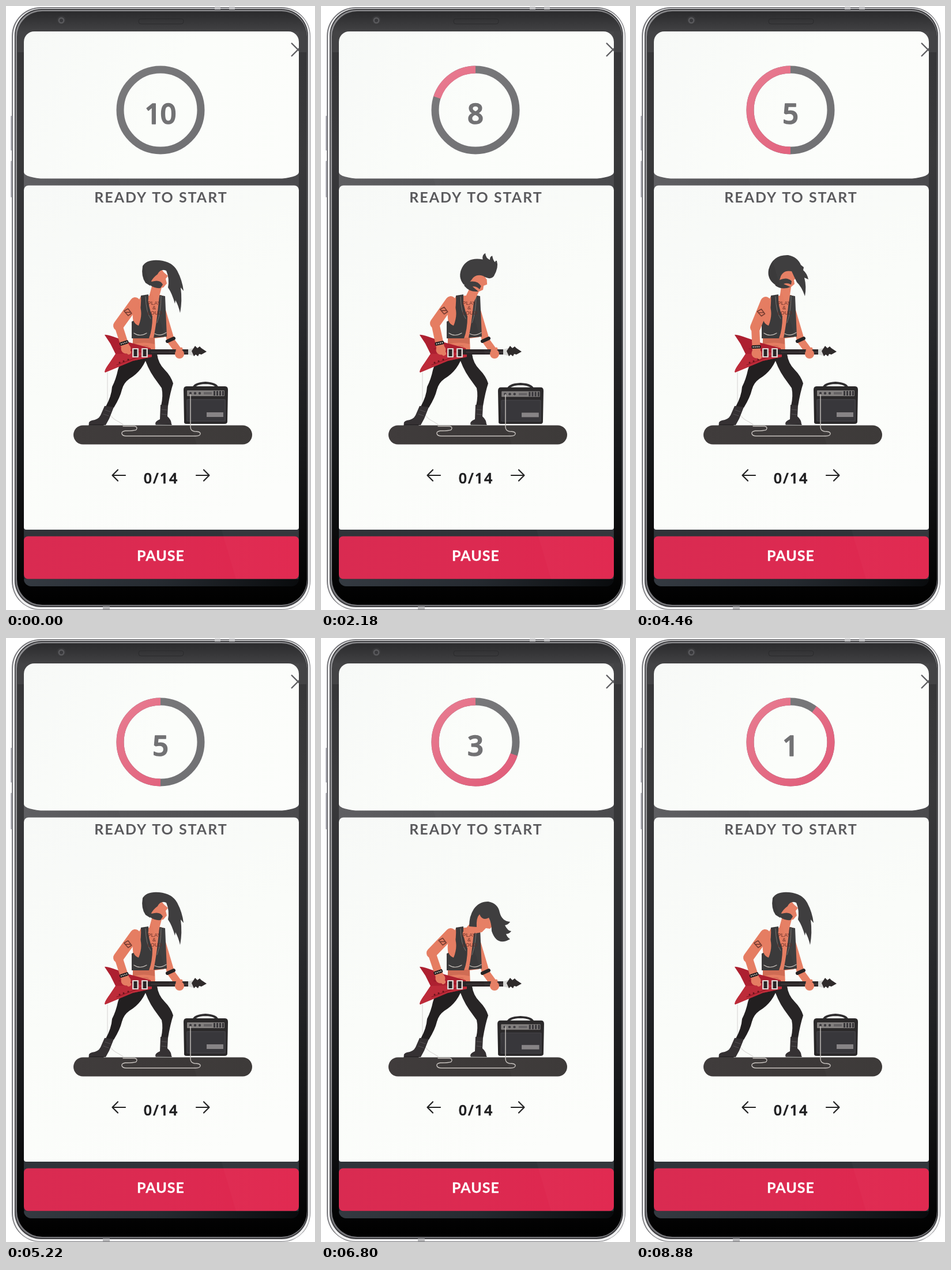
Animation, 536 px wide and 1045 px high, one loop 8900 ms. Source, as an HTML page with a canvas:

```html
<!DOCTYPE html>
<html lang="en">
<head>
<meta charset="utf-8">
<title>Ready to start</title>
<style>
html, body { margin: 0; width: 100%; height: 100%; overflow: hidden; background: #fff; }
canvas { display: block; width: 536px; height: 1045px; }
</style>
</head>
<body>
<canvas id="stage" width="536" height="1045"></canvas>
<script>
const ctx = document.getElementById('stage').getContext('2d');
const LOOP = 8900, BEAT = 888, POSES = 6;
const SKIN = '#e57d62', SKIN_DARK = '#cf6c54', HAIR = '#3b3a3b', BLACK = '#221f20', RED = '#ad2030';

// One head-bang cycle; each pose is held for a sixth of the beat.
const base = { amp: 0, fret: [286, 579, 302, 601] };
const up = {
  ...base,
  neck: [257, 510, 261, 482],
  face: 'M246 452L268 452L272 459L276 462L279 470L274 474L275 481L268 487L252 489L246 478Z',
  beard: 'M236 468Q242 473 249 474Q262 468 270 476L269 482Q262 478 256 481L268 486Q254 492 242 484Z'
};
const flung = {
  ...up, arm: [225, 512, 206, 556, 209, 601],
  hair: 'M240 482Q226 473 229 455Q233 434 259 431Q255 425 260 419Q263 427 271 428Q269 422 273 420Q277 428 281 429Q280 426 283 426Q290 436 286 453Q282 462 268 458Q254 458 251 470Q248 479 240 482Z'
};
const poses = [
  { ...up, arm: [225, 512, 207, 556, 209, 601],
    hair: 'M241 482Q227 472 230 456Q237 430 264 431Q280 434 286 448L291 452L290 457Q297 463 299 473L292 470Q296 485 293 502Q287 485 279 478Q274 468 270 459Q254 456 250 471Q248 479 241 482Z' },
  flung,
  { ...flung, arm: [225, 511, 198, 549, 208, 595], tilt: 0.3, amp: 0.5 },
  { ...base, arm: [225, 511, 192, 545, 207, 589], neck: [254, 512, 273, 490], amp: 1,
    face: 'M266 474L286 474L294 490L297 499L293 503L286 502L279 509L268 511L261 500Z',
    hair: 'M257 499Q257 481 265 469Q274 456 290 456Q307 459 310 475Q314 490 328 491Q325 496 319 497Q324 507 330 507Q327 512 321 512Q323 518 328 521Q305 534 296 507Q296 493 291 484Q280 490 275 478Q269 484 270 500Z' },
  { arm: [224, 511, 201, 551, 208, 597], fret: [273, 575, 281, 602], neck: [254, 513, 274, 494], amp: 1,
    face: 'M266 480L287 479L296 496L298 507L294 511L286 508L279 513L268 513L261 501Z',
    hair: 'M260 503Q260 485 268 475Q280 463 294 463Q308 467 310 481Q318 484 322 481Q323 487 317 490Q322 493 326 491Q324 500 317 502Q318 508 321 511Q308 520 299 511Q299 497 292 489Q282 494 276 481Q270 486 271 502Z' },
  { ...base, arm: [224, 513, 195, 553, 208, 593], neck: [255, 510, 262, 484],
    face: 'M252 458L270 456L274 461L281 467L277 472L279 480L273 487L256 490L250 478Z',
    beard: 'M244 474Q251 478 257 476Q268 474 272 482L268 488Q258 489 250 483Z',
    hair: 'M250 484L242 479Q234 468 237 450Q244 438 266 440Q288 442 297 458Q306 475 308 493L303 487Q306 510 302 531Q299 518 294 509L293 515Q288 497 281 487Q284 472 278 458Q268 454 263 464Q256 469 252 476Z' }
];

function box(x, y, w, h, r, fill) {
  ctx.beginPath();
  ctx.roundRect(x, y, w, h, r);
  ctx.fillStyle = fill;
  ctx.fill();
}
function shape(d, fill) {
  ctx.fillStyle = fill;
  ctx.fill(new Path2D(d));
}
function line(d, color, width) {
  ctx.strokeStyle = color;
  ctx.lineWidth = width;
  ctx.stroke(new Path2D(d));
}
function dot(x, y, r, fill) {
  ctx.beginPath();
  ctx.arc(x, y, r, 0, Math.PI * 2);
  ctx.fillStyle = fill;
  ctx.fill();
}
// A thin outline rounds the letter ends.
function label(text, x, y, font, color, spacing = 0, outline = 0) {
  ctx.font = font;
  ctx.letterSpacing = spacing + 'px';
  ctx.fillStyle = ctx.strokeStyle = color;
  ctx.textAlign = 'center';
  ctx.fillText(text, x + spacing / 2, y);
  if (!outline) return;
  ctx.lineWidth = outline;
  ctx.lineJoin = 'round';
  ctx.strokeText(text, x + spacing / 2, y);
}
function fade(x0, y0, x1, y1, ...colors) {
  const g = ctx.createLinearGradient(x0, y0, x1, y1);
  colors.forEach((c, i) => g.addColorStop(i / (colors.length - 1), c));
  return g;
}

function drawPhone() {
  ctx.fillStyle = '#fff';
  ctx.fillRect(0, 0, 536, 1045);
  box(8, 190, 3, 60, 1, '#b0b0b8');
  box(8, 268, 3, 63, 1, '#b0b0b8');
  box(10, 2, 518, 1043, 50, '#77777b');
  box(12, 4, 515, 1040, 48, '#f0f0f1');
  box(15, 5, 509, 1035, 46, '#3c3c3f');
  box(16.5, 7, 506, 1031, 45, fade(0, 7, 0, 1038, '#8c8c8f', '#a0a0a3', '#77777b'));
  box(19, 9, 503, 1027, 44, fade(0, 9, 0, 1036, '#363638', '#39393b', '#2a2b2e', '#17181a', '#000'));
  box(20, 10, 501, 70, [43, 43, 0, 0], fade(0, 10, 0, 46, '#2b2b2d', '#434345'));
  for (const x of [362, 387]) box(x, 1, 10, 5, 0, '#c2c2c4');
  box(168, 1039, 12, 5, 0, '#b5b5b7');
  dot(96, 25, 8, '#39393b');
  dot(96, 25, 5.5, '#59595c');
  dot(96, 25, 3, '#39393c');
  ctx.beginPath();
  ctx.roundRect(230, 22, 78, 9, 4);
  ctx.strokeStyle = '#2b2b2d';
  ctx.lineWidth = 1;
  ctx.stroke();

  const wide = { x: 36, y: 11 };
  box(31, 44, 477, 960, [18, 18, 18, 18], fade(0, 299, 0, 1004, '#505052', '#3b3c40', '#2c3036'));
  box(31, 280, 477, 40, 0, fade(31, 0, 508, 0, '#5f5f62', '#515154', '#464649'));
  box(31, 44, 477, 254.5, [18, 18, wide, wide], fade(31, 44, 508, 299, '#f7f9f7', '#fbfdfa', '#fcfdfb'));
  box(31, 310.5, 477, 595.5, [8, 8, 4, 4], fade(31, 311, 350, 907, '#f7f9f7', '#fafcf9', '#fcfdfb'));
  box(31, 917.5, 477, 74, [7, 7, 8, 8], fade(31, 0, 508, 0, '#d92b51', '#dc2a51', '#e0264e'));
  box(31, 991.5, 477, 12.5, [0, 0, 14, 14], fade(31, 0, 508, 0, '#343a41', '#252a30', '#090b0d'));

  ctx.save();
  ctx.beginPath();
  ctx.rect(480, 50, 28.5, 60);
  ctx.clip();
  line('M495 64L519 88M495 87L519 63', '#5d5d60', 2.4);
  ctx.restore();
}

function drawTimer(left) {
  ctx.lineWidth = 13;
  ctx.lineCap = 'butt';
  ctx.strokeStyle = fade(195, 105, 340, 255, '#777779', '#6d6d70');
  ctx.beginPath();
  ctx.arc(268, 180, 70, 0, Math.PI * 2);
  ctx.stroke();
  if (left < 10) {
    const top = -Math.PI / 2;
    ctx.strokeStyle = fade(195, 105, 340, 255, '#e77a90', '#df5875');
    ctx.beginPath();
    ctx.arc(268, 180, 70, top, top - Math.PI * 2 * (10 - left) / 10, true);
    ctx.stroke();
  }
  label(left, 268, 203.5, '600 49px "Open Sans", sans-serif', '#6f6f71', -1, 1.6);
}

function drawText() {
  label('READY TO START', 268, 339.5, 'bold 25px Lato, sans-serif', '#58585b', 2);
  label('0/14', 268, 825.5, '600 25px "Open Sans", sans-serif', '#202022', 2, 0.7);
  label('PAUSE', 268, 959.5, 'bold 25px Lato, sans-serif', '#fff', 1, 0.3);
  line('M207 812H185M194 802.5L184.5 812L194 821.5', '#222', 2.2);
  line('M330 812H352M343 802.5L352.5 812L343 821.5', '#222', 2.2);
}

function drawAmp(squash) {
  ctx.save();
  ctx.translate(346.5, 724);
  ctx.scale(1 + squash * 0.05, 1 - squash * 0.055);
  ctx.translate(-346.5, -724);
  line('M325 662Q326 653 346 652Q366 653 367 662', '#2b292b', 4);
  shape('M313 658H380Q385 658 385 664L384 719Q384 723 379 723H313Q308 723 309 718L308 664Q308 658 313 658Z', '#272526');
  box(314, 665, 65, 10, 1, '#7f7c7b');
  for (const x of [320, 328, 336]) dot(x, 670, 2.2, '#38363a');
  box(343, 668, 14, 4, 0, '#625f61');
  for (let x = 360; x < 378; x += 5) box(x, 666, 3, 8, 0, '#343236');
  box(313, 680, 68, 39, 2, '#3b3a3e');
  box(315, 682, 64, 35, 1, '#343337');
  box(348, 703, 29, 8, 0, '#858284');
  ctx.restore();
}

function drawLegs() {
  shape('M238 602L262 602Q264 618 275 629Q286 640 290 653Q285 668 281 692L269 692Q273 674 270 661L257 643Q245 626 238 602Z', '#282526');
  shape('M207 606L246 602Q239 630 214 645Q204 652 201 664Q198 677 187 695L173 693Q183 675 184 659Q191 645 194 630Q198 615 207 606Z', BLACK);
  shape('M171 692L187 694L179 714L173 725L144 725Q142 719 149 717Q160 716 164 708Z', '#353133');
  shape('M268 690L281 691L280 710Q287 716 287 724L259 723Q259 718 267 715Z', '#353133');
  line('M144 725H169M260 724H287', '#1b191a', 1.6);
  line('M172 699L181 702M169 706L178 709M270 698L279 699M270 706L279 707', '#595457', 0.9);
}

function drawGuitar() {
  shape('M171 569Q174 567 214 582L251 592L253 607L220 614L172 634Q169 632 180 617L190 602L181 584Z', RED);
  shape('M190 602L253 600L253 607L220 614L172 634Q169 632 180 617Z', '#bd2b39');
  line('M196 593L248 600L192 621', '#8c1724', 1.2);
  for (const x of [197, 204, 212]) dot(x, 617 - (x - 197) * 0.35, 1.5, '#67131c');
  box(246, 594, 74, 9, 0, '#2a2527');
  line('M252 599H318', '#4b4547', 1);
  for (const x of [219, 235]) {
    box(x, 592, 11, 16, 1, '#ddd5d2');
    box(x + 2.5, 594, 6, 12, 0, '#2a2527');
  }
  shape('M316 594L325 592L325 605L316 603Z', '#d6d6d4');
  shape('M322 597L328 588L332 592L336 589L339 592L348 598L339 603L335 602L333 606L329 603L326 606Z', '#2b2727');
}

function drawTorso([wx, wy, hx, hy]) {
  line(`M270 525L${wx} ${wy}L${hx} ${hy}`, SKIN, 13);
  line(`M${wx - 6} ${wy + 1}L${wx + 5} ${wy - 4}`, BLACK, 6);
  shape('M234 502L270 500L274 573L258 575L259 599L219 599L221 560L220 530Z', SKIN);
  shape('M220 574H258L258 585Q240 580 220 585Z', SKIN_DARK);
  shape('M234 501L247 499Q246 520 254 537Q254 560 248 575L218 575L218 546Q236 541 234 501Z', HAIR);
  shape('M266 500L276 502L279 572L256 574Q262 545 266 500Z', HAIR);
  line('M242 503Q243 530 251 541M269 502Q269 528 262 548', '#77736f', 1);
  line('M222 566Q232 573 244 566M258 567Q267 572 278 565', '#c9c3bd', 1.2);
  line('M239 588Q243 587 247 589', SKIN_DARK, 1.5);
}

function drawHead(p) {
  const [x0, y0, x1, y1] = p.neck;
  ctx.save();
  if (p.tilt) {
    ctx.translate(258, 508);
    ctx.rotate(p.tilt);
    ctx.translate(-258, -504);
  }
  line(`M${x0} ${y0}L${x1} ${y1}`, SKIN, 17);
  shape(p.face, SKIN);
  if (p.beard) shape(p.beard, HAIR);
  shape(p.hair, HAIR);
  ctx.restore();
  const ink = 'rgba(95,42,35,.65)', small = 'bold 9px "Liberation Sans", sans-serif';
  label('PLAY', 257, 517, small, ink);
  label('&', 257, 525, small, ink);
  label('LOUD', 258, 534, small, ink);
}

function drawArm([sx, sy, ex, ey, hx, hy]) {
  const near = (a, b, k) => a + (b - a) * k;
  ctx.lineJoin = 'round';
  line(`M${sx} ${sy}L${ex} ${ey}`, SKIN, 18);
  line(`M${ex} ${ey}L${hx} ${hy}`, SKIN, 14);
  shape('M230 513Q239 531 230 553Q218 549 220 530Z', SKIN);
  dot(hx, hy, 8.5, SKIN);
  line(`M${hx} ${hy}L${hx + 5} ${hy + 6}`, SKIN, 8);
  const tx = near(sx, ex, 0.42), ty = near(sy, ey, 0.42);
  line(`M${tx - 7} ${ty - 2}L${tx} ${ty - 6}L${tx + 6} ${ty + 2}L${tx} ${ty + 6}Z M${tx - 4} ${ty}H${tx + 4}`, 'rgba(75,35,32,.7)', 1.7);
  const bx = near(ex, hx, 0.75), by = near(ey, hy, 0.75);
  ctx.save();
  ctx.translate(bx, by);
  ctx.rotate(Math.atan2(hy - ey, hx - ex) - Math.PI / 2);
  box(-8, -3, 16, 6, 2, BLACK);
  for (let x = -5; x <= 5; x += 3.3) dot(x, 0, 1.1, '#d8d1c6');
  ctx.restore();
}

function drawStage(p) {
  const [, , handX, handY] = p.fret;
  box(117, 725.5, 310, 33, 16.5, fade(117, 0, 427, 0, '#403c3c', '#393635'));
  drawAmp(p.amp);
  line('M176 634V690Q177 711 195 719L203 724', '#dedcda', 1.3);
  line('M203 727H223Q229 728 226 733Q224 735 207 735Q200 736 201 740Q202 744 209 744H329Q338 744 337 739Q336 736 327 736Q320 735 320 728V672', '#c7c2be', 1.4);
  drawLegs();
  drawTorso(p.fret);
  drawHead(p);
  drawGuitar();
  dot(handX - 1, handY + 1, 8, SKIN);
  line(`M${handX - 5} ${handY - 5}l7 -3`, SKIN, 5);
  drawArm(p.arm);
}

function drawGlare() {
  ctx.save();
  ctx.beginPath();
  ctx.rect(31, 44, 477, 948);
  ctx.clip();
  shape('M120 44H508V992H399Z', 'rgba(255,255,255,.02)');
  ctx.restore();
}

function render(t) {
  const beat = (t - 15 + BEAT) % BEAT;
  const left = 10 - Math.floor((t + 680) / 1000);
  ctx.lineCap = 'butt';
  ctx.lineJoin = 'miter';
  drawPhone();
  drawTimer(left);
  ctx.lineCap = 'round';
  drawText();
  drawStage(poses[Math.floor(beat / BEAT * POSES)]);
  drawGlare();
}

const start = performance.now();
function tick() {
  render((performance.now() - start) % LOOP);
  requestAnimationFrame(tick);
}
tick();
</script>
</body>
</html>
```
